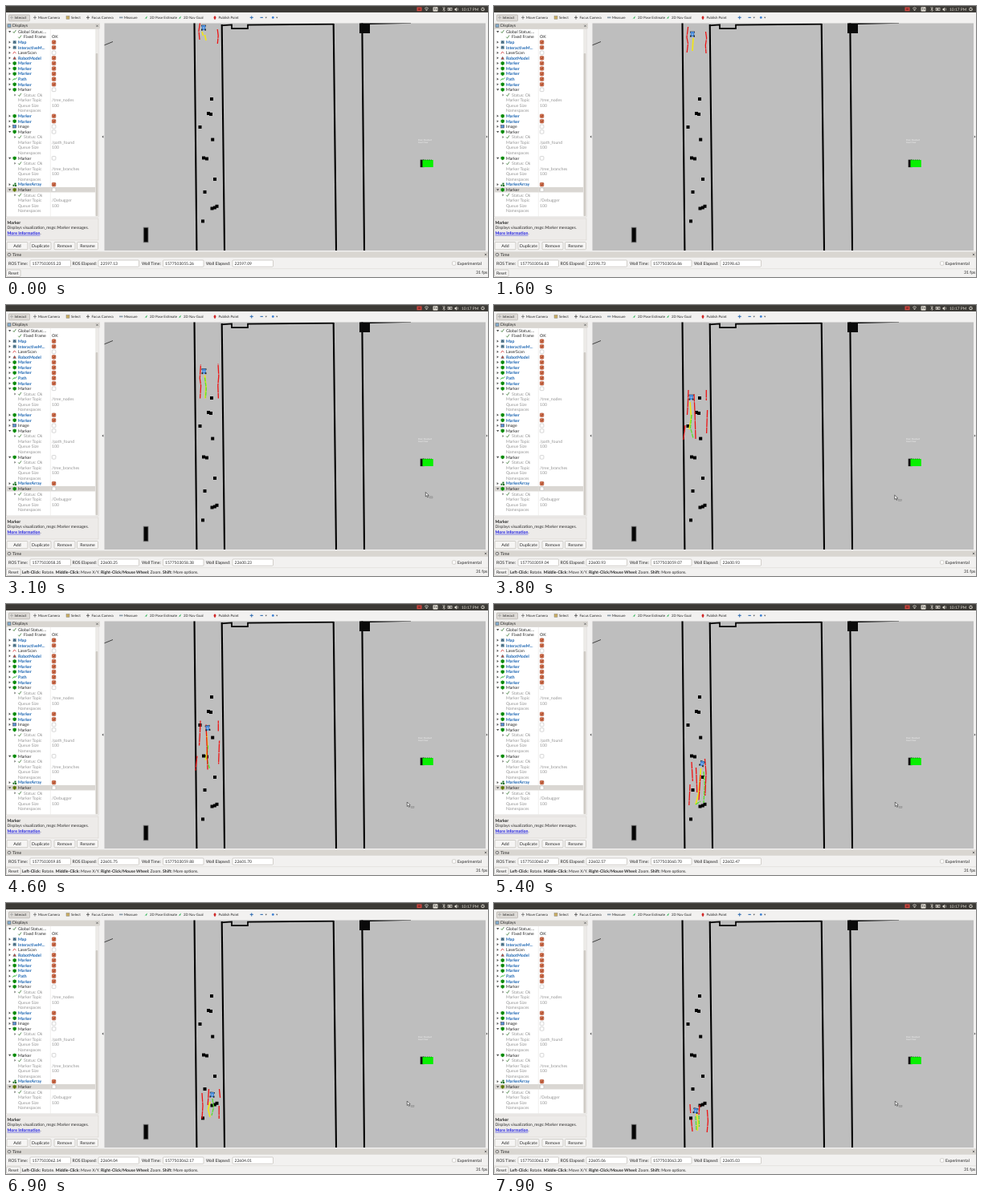
Animation of 600 by 338 pixels, one loop 8 s. Source, as an HTML page:

```html
<!DOCTYPE html>
<html lang="en">
<head>
<meta charset="utf-8">
<title>Robot navigation view</title>
<style>
html, body { margin: 0; width: 100%; height: 100%; overflow: hidden; background: #f2f1f0; }
svg { display: block; width: 100vw; height: 100vh; }
text { font: 5.2px Lato, "Open Sans", sans-serif; fill: #262626; text-rendering: geometricPrecision; white-space: pre; }
.bold { font-weight: 700; }
.on { font-weight: 700; fill: #1762b0; }
.off { fill: #949494; }
.tool { font-size: 4.4px; }
.link { font-weight: 700; fill: #1818e0; text-decoration: underline; }
</style>
</head>
<body>
<svg id="stage" viewBox="0 0 600 338" preserveAspectRatio="none"></svg>
<script>
const LOOP = 8000, STEP = 100;
const out = [];
const add = s => out.push(s);
const rect = (x, y, w, h, fill, extra = '') =>
  add(`<rect x="${x}" y="${y}" width="${w}" height="${h}" fill="${fill}" ${extra}/>`);
const path = (d, stroke, width = 1, extra = '') =>
  add(`<path d="${d}" fill="none" stroke="${stroke}" stroke-width="${width}" ${extra}/>`);
const shape = (d, fill) => add(`<path d="${d}" fill="${fill}"/>`);
const dot = (x, y, r, fill) => add(`<circle cx="${x}" cy="${y}" r="${r}" fill="${fill}"/>`);
const text = (x, y, s, cls = '', extra = '') =>
  add(`<text x="${x}" y="${y}" class="${cls}" ${extra}>${s}</text>`);
const frame = (x, y, w, h, fill = '#fff', stroke = '#b8b4ae') =>
  rect(x, y, w, h, fill, `stroke="${stroke}" stroke-width=".6" rx="1"`);
const cross = (x, y) =>
  path(`M${x - 1.2} ${y - 1.2}l2.4 2.4m0-2.4l-2.4 2.4`, '#555', .7);

function topBar() {
  rect(0, 0, 600, 8.2, '#3c3a36');
  rect(0, 0, 600, .6, '#4c4a45');
  rect(511.5, 1.5, 6, 4.8, '#d44a42');
  rect(512.8, 2.7, 3.4, 2.4, '#8f2c28');
  path('M521 3.2l2.5-1.4 2.5 1.4M522 5l1.5-1 1.5 1M523.5 5v1', '#dfdbd2', .8);
  rect(531.5, 1.3, 6, 5.4, '#dfdbd2', 'rx=".8"');
  text(532.5, 5.4, 'En', '', 'style="font-size:3.8px"');
  path('M543.5 1.5l3 4-1.5 1v-5l1.5 1-3 3', '#dfdbd2', .6);
  rect(550, 2.5, 5, 3, 'none', 'stroke="#dfdbd2" stroke-width=".7"');
  rect(551, 3.3, 2.5, 1.5, '#dfdbd2');
  shape('M558.5 3.2h1l1.6-1.5v5l-1.6-1.5h-1z', '#dfdbd2');
  path('M562 2.4q1.4 1.7 0 3.4', '#dfdbd2', .6);
  text(567, 5.7, '10:17 PM', '', 'style="font-size:4.9px;fill:#dfdbd2"');
  add('<circle cx="593.5" cy="4" r="1.7" fill="none" stroke="#dfdbd2" stroke-width="1.2" stroke-dasharray="1 .35"/>');
}

function toolBar() {
  rect(0, 8.2, 600, 13.3, '#f2f1f0');
  frame(3.5, 11, 26, 7.8, '#dedbd7', '#aaa59e');
  const tools = [[5, 10.5, 'Interact', '#aaa'], [34, 40, 'Move Camera', '#777'], [75, 81, 'Select', '#c9ac62'],
    [100, 106.5, 'Focus Camera', '#555'], [141, 147, 'Measure', '#8a9ca8'], [172, 179, '2D Pose Estimate', '#22b14c'],
    [214, 221, '2D Nav Goal', '#22b14c'], [258, 264.5, 'Publish Point', '#d02828']];
  tools.forEach(([x, tx, label, color], i) => {
    const green = i === 5 || i === 6;
    if (green) shape(`M${x} 16.5l3.8-4-.8 3.2-1.4-.4z`, color);
    else if (i === 7) shape(`M${x + 2} 17.3q-3-3.5 0-5 3 1.5 0 5z`, color);
    else if (i === 2) rect(x, 12.5, 4, 3.8, color, 'stroke="#777" stroke-width=".4"');
    else if (i === 4) path(`M${x} 14.4h4.5`, color, 1.8);
    else path(`M${x} 14.4h4M${x + 2} 12.2v4.4`, color, .9);
    text(tx, 16.2, label, 'tool');
  });
  path('M303.7 14.4h4M305.7 12.4v4', '#3e76b5', 1.1);
  path('M316.5 14.4h3.4', '#3e76b5', 1.2);
  dot(332.3, 14.4, 1.4, '#3c7ed0');
  [322.5, 336].forEach(x => shape(`M${x} 13.8h2.4l-1.2 1.6z`, '#555'));
}

// Each row: depth, label, value ("1" ticked, "0" empty), icon
const details = topic => [[1, 'Status: Ok', '', 'tick'], [1, 'Marker Topic', topic], [1, 'Queue Size', '100'], [1, 'Namespaces', '']];
const cube = [0, 'Marker', '1', 'cube'], cubeOff = [0, 'Marker', '0', 'cube'];
const rows = [[0, 'Global Status:...', '', 'tick'], [1, 'Fixed Frame', 'OK', 'tick'],
  [0, 'Map', '1', 'map'], [0, 'InteractiveM...', '1', 'map'], [0, 'LaserScan', '0', 'scan'], [0, 'RobotModel', '1', 'robot'],
  cube, cube, cube, [0, 'Path', '1', 'path'], cube, cubeOff, ...details('/tree_nodes'),
  cube, cube, [0, 'Image', '0', 'image'], cubeOff, ...details('/path_found'),
  cubeOff, ...details('/tree_branches'), [0, 'MarkerArray', '1', 'array'], cubeOff, ...details('/Debugger')];
const SELECTED = 30;

function icon(kind, x, y, id = '') {
  if (kind === 'tick') path(`M${x} ${y}l1.3 1.6 2.4-3.6`, '#3a7a35', .8);
  if (kind === 'cube') {
    add(`<path ${id} d="M${x + 2} ${y - 2.4}l2.2 1.1v2.5l-2.2 1.3-2.2-1.3v-2.5z" fill="#12a012"/>`);
    path(`M${x} ${y - 1.2}l2 1 2-1M${x + 2} ${y - .2}v2.4`, '#0a4d0d', .5);
  }
  if (kind === 'map') {
    rect(x, y - 2, 4, 4, '#668ca0');
    path(`M${x + .5} ${y + 1}l1.3-2 1.7 2`, '#263f55', .7);
  }
  if (kind === 'robot') {
    shape(`M${x - .3} ${y + 2}l2.3-4.2 2.3 4.2z`, '#5c7484');
    rect(x + 1, y - .6, 2, 2, '#c94b3c');
  }
  if (kind === 'path') path(`M${x - .3} ${y + 1.5}l1.6-2 1.4.8 1.8-2`, '#1fb02a', 1);
  if (kind === 'scan') path(`M${x} ${y + 1.4}l1.8-2.8 2 2.4`, '#d53a3a', .8);
  if (kind === 'image') rect(x, y - 1.7, 4, 3.4, '#5b93d2', 'stroke="#334" stroke-width=".5"');
  if (kind === 'array') [[-.2, .1], [1.8, -2], [2.4, .4]].forEach(([a, b]) => rect(x + a, y + b, 2, 2, '#126a1c'));
}

function displays() {
  rect(0, 21.5, 120, 284, '#f2f1f0');
  rect(0, 21.5, 117, 6.8, '#d9d6d1');
  rect(2, 22.8, 4, 3.6, '#86aed0', 'stroke="#555" stroke-width=".5"');
  text(8, 26.4, 'Displays');
  cross(113.5, 24.8);
  rect(.3, 28.4, 114.7, 234.6, '#fff', 'stroke="#c4c0ba" stroke-width=".5"');
  rect(111.2, 28.7, 3.6, 234, '#eceae7');
  rect(111.7, 59, 2.6, 203, '#cfcbc5', 'rx="1"');
  rows.forEach(([depth, label, value, kind], i) => {
    const y = 32 + i * 6.574, check = value === '0' || value === '1';
    const grey = depth && i > 1;
    if (i === SELECTED) rect(.5, y - 3.3, 110.5, 6.5, '#dad7d3');
    const open = i === 0 || (value === '0' && kind === 'cube');
    if (!depth) shape(open ? `M3 ${y - 1}h3.4l-1.7 2.4z` : `M3.6 ${y - 1.6}v3.2l2.2-1.6z`, '#555');
    else if (kind && grey) shape(`M10.4 ${y - 1.5}v3l2-1.5z`, '#777');
    if (kind) icon(kind, depth ? 15.3 : 8.7, y, i === SELECTED ? 'id="picked"' : '');
    const tx = depth ? (kind ? 22 : 15) : 15;
    text(tx, y + 1.8, label, value === '1' ? 'on' : grey ? 'off' : '');
    if (check) {
      const on = value === '1';
      frame(57.3, y - 2.3, 4.6, 4.6, on ? '#d8704a' : '#fff', on ? '#a9573e' : '#bbb');
      if (on) path(`M58.4 ${y - .3}l1.1 1.3 1.7-2.3`, '#70301d', .7);
    } else text(57, y + 1.8, value, grey ? 'off' : '');
  });
  path('M55.3 28.7V262.7', '#e2e0dd', .5);
  rect(.3, 265, 114.7, 27, '#edebe9', 'stroke="#d0ccc7" stroke-width=".5"');
  text(1.5, 271.7, 'Marker', 'bold');
  text(1.5, 278.2, 'Displays visualization_msgs::Marker messages.', '', 'style="font-size:5px"');
  text(1.5, 284.8, '<tspan class="link">More Information</tspan>.');
  [['Add', 1], ['Duplicate', 30], ['Remove', 60], ['Rename', 88.5]].forEach(([s, x]) => {
    frame(x, 294.5, 26, 9.2, '#f6f5f4');
    text(x + 13, 301, s, '', 'text-anchor="middle"');
  });
  shape('M121.3 161.5v3.2l-1.9-1.6z', '#555');
}

function view() {
  rect(122.5, 21.5, 474.5, 283.5, '#bebebe');
  add('<g clip-path="url(#port)">');
  path('M234.5 21L237.4 305M268.7 23L272 305M407.7 22L411 305M443.3 21L446 305', '#000', 2.1);
  path('M268 24.3L281 23.5V28.2H301V23.6L408 22.6', '#000', 1.7);
  path('M453 22L504 20.8', '#000', 1.8);
  rect(440, 21, 13, 13, '#0a0a0a');
  path('M122 49L133 44.5', '#222', .8);
  rect(171.2, 276.2, 5.8, 18.6, '#050505', 'stroke="#777" stroke-width=".8"');
  const boxes = [[256, 116], [252, 134], [255, 135], [241.5, 151], [257.2, 166.6], [246, 189.5], [250, 190.5],
    [260, 216], [247.5, 232], [256.5, 252.5], [259.8, 251.5], [262.5, 249.8], [245, 268.4]];
  boxes.forEach(([x, y]) => rect(x - 2, y - 2, 4, 4, '#000'));
  rect(515.7, 191.7, 5, 9.4, '#111');
  rect(518.5, 192, 13.3, 9, '#08f000');
  path('M519 192h11', '#087a08', .8, 'stroke-dasharray="1.5 1"');
  const tiny = 'style="font-size:2.6px;fill:#f4f4f4"';
  text(513, 168, 'Pose: Standard', '', tiny);
  text(513, 171.2, 'Goal: Clear', '', tiny);
  add('<path id="trail" fill="none" stroke="#f0e51b" stroke-width="1.7"/>');
  add('<path id="plan" fill="none" stroke="#55e22d" stroke-width="1.3" stroke-dasharray="5 1"/>');
  add('<path id="scan" fill="none" stroke="#ee1212" stroke-width="1.3" stroke-dasharray="11 .6"/>');
  add('<g id="robot">');
  rect(-3, -3.3, 6, 1.8, '#222');
  rect(-2.3, -3, 4.6, 6.2, '#4588d8');
  rect(-3, 1.6, 1.6, 2, '#222');
  rect(1.4, 1.6, 1.6, 2, '#222');
  dot(0, .3, 1.1, '#8ab7e8');
  add('</g></g>');
  shape('M597.8 161.5v3.2l1.7-1.6z', '#555');
}

function timePanel() {
  rect(0, 305.4, 600, 33, '#f2f1f0');
  rect(0, 306.4, 600, 7.4, '#d9d6d1');
  add('<circle cx="4" cy="310.1" r="1.8" fill="#fff" stroke="#444" stroke-width=".7"/>');
  path('M4 309v1.2h1', '#444', .4);
  text(8, 312, 'Time');
  cross(597, 310);
  [['ROS Time:', 3, 30], ['ROS Elapsed:', 82.5, 115], ['Wall Time:', 169, 195.5], ['Wall Elapsed:', 249, 282]]
    .forEach(([s, x, box], i) => {
      text(x, 323, s);
      frame(box, 317, 50.5, 8.2);
      text(box + 2.5, 323, '', '', `id="clock${i}" style="font-size:5px"`);
    });
  frame(555.5, 318.8, 4.4, 4.4);
  text(562, 323, 'Experimental');
  rect(0, 327.6, 600, .5, '#d5d1cc');
  frame(.6, 329, 17.5, 8.4, '#f6f5f4');
  text(3, 335, 'Reset');
  add('<text id="hint" x="20" y="335" style="font-size:5.1px"><tspan class="bold">Left-Click:</tspan> Rotate. <tspan class="bold">Middle-Click:</tspan> Move X/Y. <tspan class="bold">Right-Click/Mouse Wheel:</tspan> Zoom. <tspan class="bold">Shift:</tspan> More options.</text>');
  text(585, 334, '31 fps');
}

add('<defs><clipPath id="port"><rect x="122.5" y="21.5" width="474.5" height="283.5"/></clipPath></defs>');
topBar();
toolBar();
displays();
view();
timePanel();
add('<g id="cursor"><rect x="4.7" y="5.3" width="4" height="2.2" fill="#aaa" stroke="#888" stroke-width=".4"/>' +
  '<path d="M0 0v5.4l1.3-1.1 1 2.1 1-.5-1-2h1.6z" fill="#fff" stroke="#222" stroke-width=".6"/></g>');
const stage = document.getElementById('stage');
stage.innerHTML = out.join('');
const el = id => document.getElementById(id);

// time, x, y, tilt
const drive = [[0, 246, 27, 0], [900, 246.5, 30, 0], [1600, 247, 35, 0], [1800, 247, 39, 0], [2400, 247, 55, 0],
  [2700, 247, 64, 0], [3800, 245.5, 115, 0], [4500, 250, 149, -12], [5400, 259, 199, 22], [6300, 258.7, 227, 8],
  [6900, 256.7, 239, 4], [7200, 255, 245, 8], [7900, 251, 259, 10]];
const pointer = [[1900, 560, 296], [2400, 434, 222], [2700, 480, 228], [3000, 527, 233], [3600, 499, 236],
  [3800, 498.7, 237], [4500, 499.3, 247]];
const clocks = [[0, 55.23, 97.09], [1600, 56.83, 98.63], [2400, 57.66, 99.53], [3800, 59.036, 100.93],
  [5400, 60.67, 102.47], [6900, 62.14, 104.01], [7900, 63.166, 105.03]];

// Laser returns and paths, drawn with the robot's height as zero
const sweeps = [
  { t: 0, scan: 'M241.5-6L240 4 241 15M263.2 2L264.2 10 263.3 20', trail: 'M244 5L245.5 10M247.5 9L249 16', plan: '' },
  { t: 1600, scan: 'M241.6-9L240 4 241.5 12 240.2 23M263.5-3L264.6 5 263.3 14 264 24', trail: 'M248 5L247 21', plan: '' },
  { t: 2400, scan: 'M242.4-8L241.3 9 242.6 18 241.6 34M264-9L264.8 6 263.8 18 264.4 34', trail: 'M248 5L249.5 18 248.5 34', plan: 'M248 8L249.8 22 249 33' },
  { t: 3800, scan: 'M242-9L241.3 10 240.5 22M238 35L235.8 53M249-4L250 18 251 52M264.3-9V4M265.6 16L264.6 45', trail: 'M244 6L245.5 25 243 40', plan: 'M246 22L244.5 38 248 51' },
  { t: 5400, scan: 'M246-2L247.3 22M244 26L242.8 52M251.5 5L252.8 36M262.5-6L264 12 262.8 40M257 14L255 46', trail: 'M257.5 6L256 24 254.5 38 251 51', plan: 'M261 10L262.3 26 261 49M251 51L257 47' },
  { t: 6900, scan: 'M244-2L245 14 244 30M265.5-7L266.6 4M265.2 14V30M252.5-7L251.2 13', trail: 'M254 9L251.6 18 254 28', plan: 'M257 5L258.5 16 256 26' },
  { t: 7900, scan: 'M244-8L244.7 3M245.5 11L247 26M265.4-1L266.4 13 265.2 27M256-7L255 5', trail: 'M252 4L254 13 253 25', plan: 'M251 7L252 24M255 6L255.5 20' }
];

function at(keys, t) {
  const i = keys.findIndex(k => k[0] > t);
  if (i === 0) return keys[0].slice(1);
  if (i < 0) return keys[keys.length - 1].slice(1);
  const a = keys[i - 1], b = keys[i], u = (t - a[0]) / (b[0] - a[0]);
  return a.slice(1).map((v, n) => v + (b[n + 1] - v) * u);
}

function draw(t) {
  const [x, y, tilt] = at(drive, t);
  const sweep = sweeps.reduce((a, b) => Math.abs(b.t - t) < Math.abs(a.t - t) ? b : a);
  el('robot').setAttribute('transform', `translate(${x} ${y}) rotate(${tilt})`);
  const drift = x - at(drive, sweep.t)[0];
  for (const name of ['scan', 'trail', 'plan']) {
    el(name).setAttribute('d', sweep[name]);
    el(name).setAttribute('transform', `translate(${name === 'scan' ? 0 : drift} ${y})`);
  }
  el('scan').setAttribute('stroke-dashoffset', t / STEP * 3.7 % 11.6);

  const hover = t >= 1900;
  const [cx, cy] = at(pointer, t);
  el('cursor').setAttribute('transform', `translate(${cx} ${cy})`);
  el('cursor').setAttribute('visibility', hover ? 'visible' : 'hidden');
  el('hint').setAttribute('visibility', hover ? 'visible' : 'hidden');
  el('picked').setAttribute('fill', t >= 900 && t < 4200 ? '#12a012' : '#7b8a16');

  const [ros, wall] = at(clocks, t);
  ['15775030' + ros.toFixed(2), (22541.897 + ros).toFixed(2), '15775030' + (ros + .03).toFixed(2), (22500 + wall).toFixed(2)]
    .forEach((s, i) => { el('clock' + i).textContent = s; });
}

const start = performance.now();
function tick() {
  const t = (performance.now() - start) % LOOP;
  draw(Math.floor(t / STEP) * STEP);
  requestAnimationFrame(tick);
}
tick();
</script>
</body>
</html>
```
